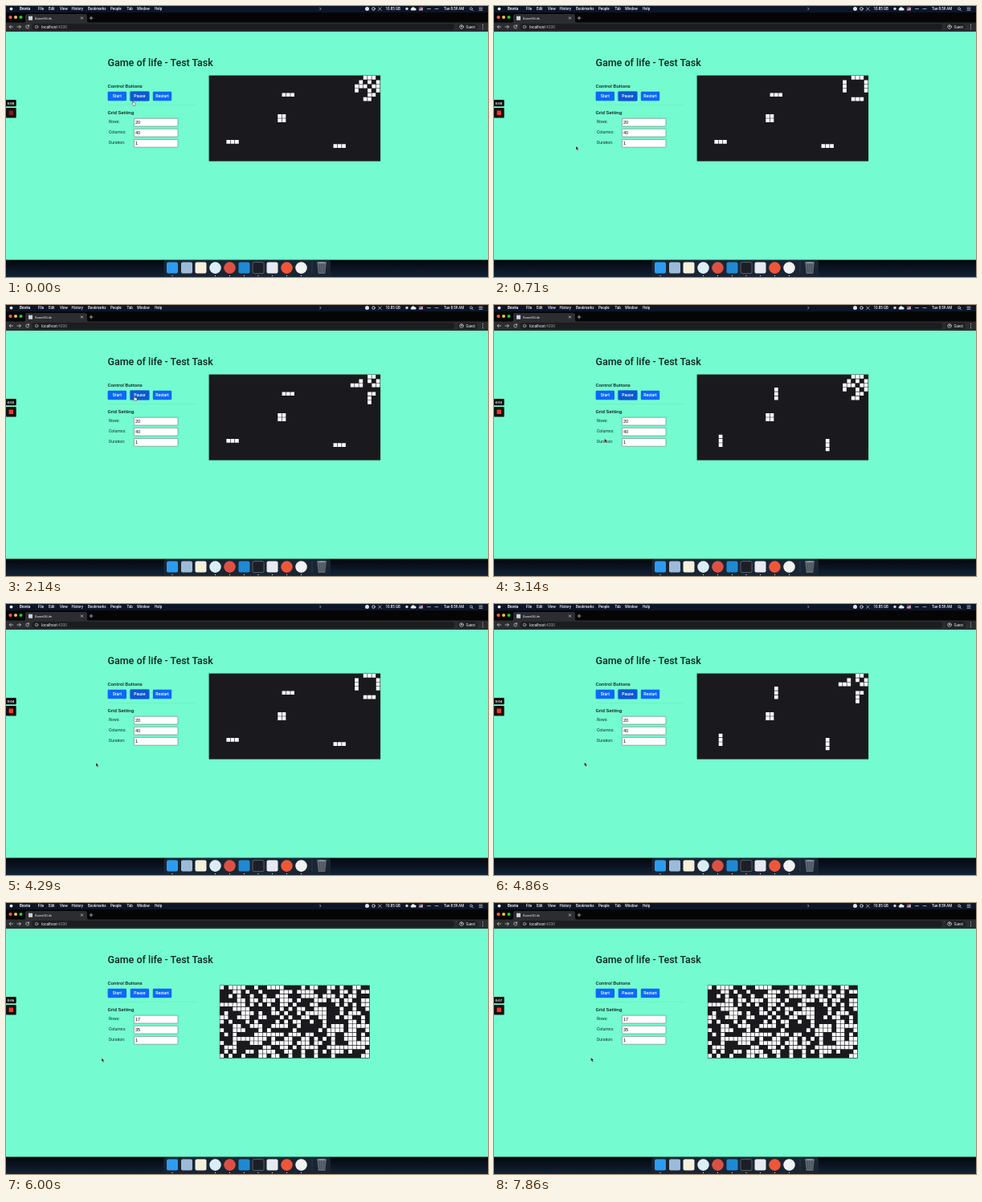
An HTML page that plays this animation: 600 px wide and 338 px high, repeating every 8000 ms.

```html
<!DOCTYPE html>
<html lang="en">
<head>
<meta charset="utf-8">
<title>GameOfLife</title>
<style>
html, body { margin: 0; width: 100%; height: 100%; overflow: hidden; background: #0d1522; }
svg { display: block; width: 100vw; height: 100vh; }
text { font-family: Roboto, sans-serif; white-space: pre; }
.menu { font-size: 4.45px; fill: #eef0f4; }
.title { font-size: 12.5px; font-weight: 500; fill: #0f2520; }
.head { font-size: 6.2px; font-weight: 500; fill: #0d1f1a; }
.label { font-size: 5.05px; fill: #0f2a23; }
.value { font-family: "Liberation Sans", Arial, sans-serif; font-size: 5.5px; fill: #000; }
.button { font-size: 5.05px; font-weight: 500; fill: #fff; text-anchor: middle; }
.line { fill: none; stroke: #d5d7da; stroke-width: .7; stroke-linecap: round; stroke-linejoin: round; }
</style>
</head>
<body>
<svg viewBox="0 0 600 338" preserveAspectRatio="none">
  <defs>
    <linearGradient id="desk" x1="0" x2="0" y1="316" y2="338" gradientUnits="userSpaceOnUse">
      <stop offset="0" stop-color="#03060a"/>
      <stop offset=".35" stop-color="#08101a"/>
      <stop offset="1" stop-color="#132335"/>
    </linearGradient>
  </defs>
  <rect width="600" height="338" fill="url(#desk)"/>

  <!-- menu bar -->
  <rect width="600" height="8" fill="#0c1629"/>
  <circle cx="6.5" cy="3.6" r="1.9" fill="#f2f2f2"/>
  <g id="menu" class="menu"></g>
  <path class="line" d="M390.8 2.2l1 1.3-1 1.3"/>
  <circle cx="449.5" cy="3.5" r="2.5" fill="#dfe3e8"/>
  <circle cx="457.5" cy="3.5" r="1.8" class="line" style="stroke-width:1"/>
  <path class="line" d="M463.5 1.8l3.6 3.6m0-3.6l-3.6 3.6M524.5 3.6h4M534 3.6h4M589 2h4m-4 1.7h4m-4 1.7h4M580.2 4.6l1.4 1.4"/>
  <circle cx="499" cy="3.5" r="1.7" fill="#cfd4da"/>
  <path d="M504.5 5.4a1.4 1.4 0 0 1 .3-2.6a2 2 0 0 1 3.8-.2a1.4 1.4 0 0 1 .9 2.8z" fill="#f0f1f3"/>
  <rect x="514" y="1.8" width="5" height="3.6" fill="#d9dbe6"/>
  <path d="M514 2.4h5m-5 1.3h5m-5 1.3h5" stroke="#c8404a" stroke-width=".6"/>
  <rect x="514" y="1.8" width="2.3" height="1.8" fill="#34509a"/>
  <circle cx="579" cy="3.4" r="1.5" class="line"/>

  <!-- browser frame -->
  <rect y="8" width="600" height="13" fill="#050506"/>
  <rect y="20.5" width="600" height="11.5" fill="#2c2d30"/>
  <path d="M22 21q2 0 2-2v-6.5q0-2.5 2.5-2.5h72q2.5 0 2.5 2.5V19q0 2 2 2z" fill="#2c2d30"/>
  <circle cx="5.5" cy="14" r="2.1" fill="#fb5a52"/>
  <circle cx="12" cy="14" r="2.1" fill="#f8bb2e"/>
  <circle cx="18.5" cy="14" r="2.1" fill="#29c441"/>
  <rect id="favicon" x="28" y="12.7" width="5" height="5" fill="#c9d4de"/>
  <circle id="spinner" cx="30.5" cy="15.2" r="2.3" fill="none" stroke="#cdd1d6" stroke-width="1"/>
  <text x="35.7" y="16.7" font-size="4.05" fill="#eceef0">GameOfLife</text>
  <path class="line" d="M93.3 13.8l2.4 2.4m0-2.4l-2.4 2.4M104 15h4m-2-2v4"/>
  <rect x="32.5" y="22" width="526" height="8" rx="4" fill="#1c1d1f"/>
  <path class="line" d="M8.6 26H4.2m1.8-1.8L4.2 26 6 27.8"/>
  <path class="line" d="M14 26h4.4m-1.8-1.8l1.8 1.8-1.8 1.8"/>
  <path id="reload" class="line" d="M28.4 24.8a2 2 0 1 0 .2 1.9M28.6 23.8v1.3h-1.4"/>
  <path id="stop" class="line" d="M25 24.4l3.2 3.2m0-3.2L25 27.6"/>
  <circle cx="38" cy="26" r="1.9" class="line" style="stroke-width:.5"/>
  <path class="line" style="stroke-width:.5" d="M38 25.9v1"/>
  <text x="44" y="27.8" font-size="4.85" fill="#f0f1f2">localhost<tspan fill="#96999e">:4200</tspan></text>
  <rect x="562" y="22" width="25" height="8" rx="4" fill="#1f2022"/>
  <circle cx="567" cy="26" r="2.4" class="line"/>
  <circle cx="567" cy="25.5" r=".9" fill="#d5d7da"/>
  <text x="572.4" y="27.7" font-size="4.45" fill="#eceef0">Guest</text>
  <path d="M593.5 23.5v.1m0 2.4v.1m0 2.4v.1" class="line" style="stroke-width:1"/>

  <!-- page -->
  <rect y="32" width="600" height="284.6" fill="#74fbcf"/>
  <text class="title" x="126.4" y="74.8">Game of life - Test Task</text>
  <text class="head" x="126.5" y="102.4">Control Buttons</text>
  <text class="head" x="126.5" y="134.6">Grid Setting</text>
  <path d="M127 123.5h109" stroke="#6cebc2" stroke-width=".6"/>
  <rect id="focus" x="153.8" y="105.9" width="25.2" height="13.2" rx="1.8" fill="#4aa6dd"/>
  <g id="form"></g>
  <rect id="board" fill="#1a191e"/>
  <path id="cells" fill="#fbfbfb"/>

  <!-- recorder -->
  <rect y="117" width="12.7" height="8.2" rx=".8" fill="#08090b"/>
  <text id="clock" x="1.6" y="122.7" font-size="4.3" font-weight="700" fill="#f4f4f4"></text>
  <rect y="127" width="12.7" height="12.6" rx=".8" fill="#14100f"/>
  <rect id="record" x="3.6" y="130.6" width="5.4" height="5.4" rx=".6"/>

  <!-- dock -->
  <rect x="196.5" y="317" width="207.5" height="23" rx="2.5" fill="#1a2533"/>
  <g id="dock"></g>
  <path d="M381 319.5v14" stroke="#46515f" stroke-width=".5"/>
  <path d="M387.2 320h11.6l-1.5 14h-8.6z" fill="#5c646d"/>
  <path d="M390 322l.8 10m2.2-10v10m3-10l-.8 10" stroke="#434a53" stroke-width=".7"/>
  <ellipse cx="393" cy="320" rx="5.9" ry="1" fill="#8b9199"/>

  <path id="arrow" d="M0 0v4.8l1.1-1 .9 1.9 1-.5-.9-1.8h1.5z" fill="#0b1512" stroke="#e8fff6" stroke-width=".35"/>
  <path id="hand" d="M.2 .3q.7-.6 1.1 .2v1.6l2.3 .6q.7 .3 .5 1.2l-.5 2H1.2L-.5 3.6q.2-.6 .8-.2z" fill="#fff" stroke="#111" stroke-width=".45"/>
</svg>
<script>
const $ = id => document.getElementById(id);
const TICK = 1000 / 7, LOOP = 8000, CELL = 5.325;

function add(parent, tag, attrs, content = '') {
  const node = document.createElementNS('http://www.w3.org/2000/svg', tag);
  for (const key in attrs) node.setAttribute(key, attrs[key]);
  node.textContent = content;
  $(parent).append(node);
  return node;
}

[['Bronta', 17], ['File', 40], ['Edit', 53], ['View', 67], ['History', 81.6], ['Bookmarks', 102],
 ['People', 130], ['Tab', 150.6], ['Window', 163], ['Help', 185], ['10.85 GB', 472.5], ['Tue 8:59 AM', 545]]
  .forEach(([word, x], i) => add('menu', 'text', { x, y: 5.2, 'font-weight': i ? 500 : 700 }, word));

const buttons = ['Start', 'Pause', 'Restart'].map((word, i) => {
  const x = 126.6 + i * 28.1;
  const box = add('form', 'rect', { x, y: 106.8, width: 23.4, height: 11.4, rx: 1.3, fill: '#0d69fa' });
  add('form', 'text', { x: x + 11.7, y: 114.2, class: 'button' }, word);
  return box;
});
const fields = ['Rows:', 'Columns:', 'Duration:'].map((word, i) => {
  const y = 140.2 + i * 13.1;
  add('form', 'text', { x: 128, y: y + 5.3, class: 'label' }, word);
  add('form', 'rect', { x: 159.4, y, width: 54.6, height: 9.8, rx: .7, fill: '#fff', stroke: '#62776f', 'stroke-width': .6 });
  return add('form', 'text', { x: 161, y: y + 6.9, class: 'value' });
});

[['s', 207, '#2d9cf0'], ['s', 225, '#9dbbd9'], ['s', 242.5, '#f5f0dc'], ['c', 260.5, '#dceef5'],
 ['c', 278.5, '#dd5144'], ['s', 296.5, '#2089d3'], ['s', 314, '#1c2026'], ['s', 331.5, '#e7e9f1'],
 ['c', 349.5, '#ee5639'], ['c', 367.5, '#f1f2f2']].forEach(([kind, x, fill], i) => {
  if (kind === 'c') add('dock', 'circle', { cx: x, cy: 326.6, r: 7.3, fill });
  else add('dock', 'rect', { x: x - 7, y: 319.6, width: 14, height: 14, rx: 2, fill, stroke: '#7f8894', 'stroke-width': i === 6 ? .6 : 0 });
  if (i !== 1 && i !== 2) add('dock', 'circle', { cx: x, cy: 336.4, r: .6, fill: '#e4e7ea' });
});

// Boards are arrays of rows holding 0 or 1.
const makeBoard = (rows, cols, rule) =>
  Array.from({ length: rows }, (_, r) => Array.from({ length: cols }, (_, c) => +rule(r, c)));

function evolve(board) {
  return makeBoard(board.length, board[0].length, (r, c) => {
    let sum = -board[r][c];
    for (let y = r - 1; y <= r + 1; y++)
      for (let x = c - 1; x <= c + 1; x++) sum += board[y]?.[x] ?? 0;
    return sum === 3 || (sum === 2 && board[r][c]);
  });
}

const start = makeBoard(20, 40, () => 0);
function stamp(row, col, ...lines) {
  lines.forEach((line, r) => [...line].forEach((ch, c) => { start[row + r][col + c] = +(ch === 'O'); }));
}
stamp(0, 34, '..OOO.', '.O.O.O', 'OOO.OO', 'O..O.O', '...OO.', '..OO..');
stamp(4, 17, 'OOO');
stamp(9, 16, 'OO', 'OO');
stamp(15, 4, 'OOO');
stamp(16, 29, 'OOO');
const generations = [start];
for (let i = 0; i < 5; i++) generations.push(evolve(generations[i]));

let seed = 41;
const random = () => (seed = seed * 16807 % 2147483647) / 2147483647;
for (let i = 0; i < 9; i++) random();
const soup = makeBoard(17, 35, () => random() < .5);

const generation = tick => Math.max(0, Math.min(5, Math.floor((tick + 2) / 7)));

// The left part of the old board repaints one tick after the right part.
function boardAt(tick) {
  if (tick >= 41) return soup;
  const right = generations[generation(tick)], left = generations[generation(tick - 1)];
  return makeBoard(20, 40, (r, c) => (c < 32 ? left : right)[r][c]);
}

function drawBoard(board) {
  const width = board[0].length * CELL, height = board.length * CELL;
  const left = 359.3 - width / 2, top = 193.3 - height;
  const box = { x: left - .2, y: top - .2, width: width + .5, height: height + .5 };
  for (const key in box) $('board').setAttribute(key, box[key]);
  let d = '';
  board.forEach((row, r) => row.forEach((on, c) => {
    if (on) d += `M${left + c * CELL + .3} ${top + r * CELL + .3}h4.7v4.7h-4.7z`;
  }));
  $('cells').setAttribute('d', d);
}

const path = [[0, 157.2, 118.2], [5, 102, 174.8], [9, 102.5, 174.8], [15, 159, 113.4], [17, 159, 113.6],
  [22, 137.5, 166.6], [30, 112, 198], [33, 112.3, 197.6], [40, 117.2, 194.3], [42, 119, 193.3], [49, 120.2, 192.4], [55, 120.6, 192.7]];
function pointerAt(tick) {
  const i = Math.max(1, path.findIndex(p => p[0] >= tick));
  const [t0, x0, y0] = path[i - 1], [t1, x1, y1] = path[i];
  const k = (tick - t0) / (t1 - t0), e = k * k * (3 - 2 * k);
  return [x0 + (x1 - x0) * e, y0 + (y1 - y0) * e];
}

const show = (id, on) => $(id).setAttribute('visibility', on ? 'visible' : 'hidden');

function draw(tick) {
  const fresh = tick >= 41, loading = tick >= 38 && !fresh;
  drawBoard(boardAt(tick));
  [fresh ? 17 : 20, fresh ? 35 : 40, 1].forEach((n, i) => { fields[i].textContent = n; });
  $('clock').textContent = '0:0' + Math.floor(tick / 7);
  $('record').setAttribute('fill', tick < 2 ? '#7c1f1a' : '#ee3a2c');
  show('focus', !fresh);
  buttons[1].setAttribute('fill', fresh ? '#0d69fa' : '#0b58d2');
  show('reload', !loading);
  show('stop', loading);
  show('spinner', loading);
  show('favicon', !loading);

  const [x, y] = pointerAt(tick);
  const over = x > 154 && x < 179 && y < 119;
  show('hand', over);
  show('arrow', !over);
  for (const id of ['hand', 'arrow']) $(id).setAttribute('transform', `translate(${x} ${y})`);
}

// Late in the loop the picture only refreshes at these ticks.
const holds = [55, 49, 42];
let origin, last = -1;
function frame(now) {
  origin ??= now;
  let tick = Math.floor(((now - origin) % LOOP + 5) / TICK);
  tick = holds.find(h => tick >= h) ?? tick;
  if (tick !== last) draw(last = tick);
  requestAnimationFrame(frame);
}
draw(0);
requestAnimationFrame(frame);
</script>
</body>
</html>
```
